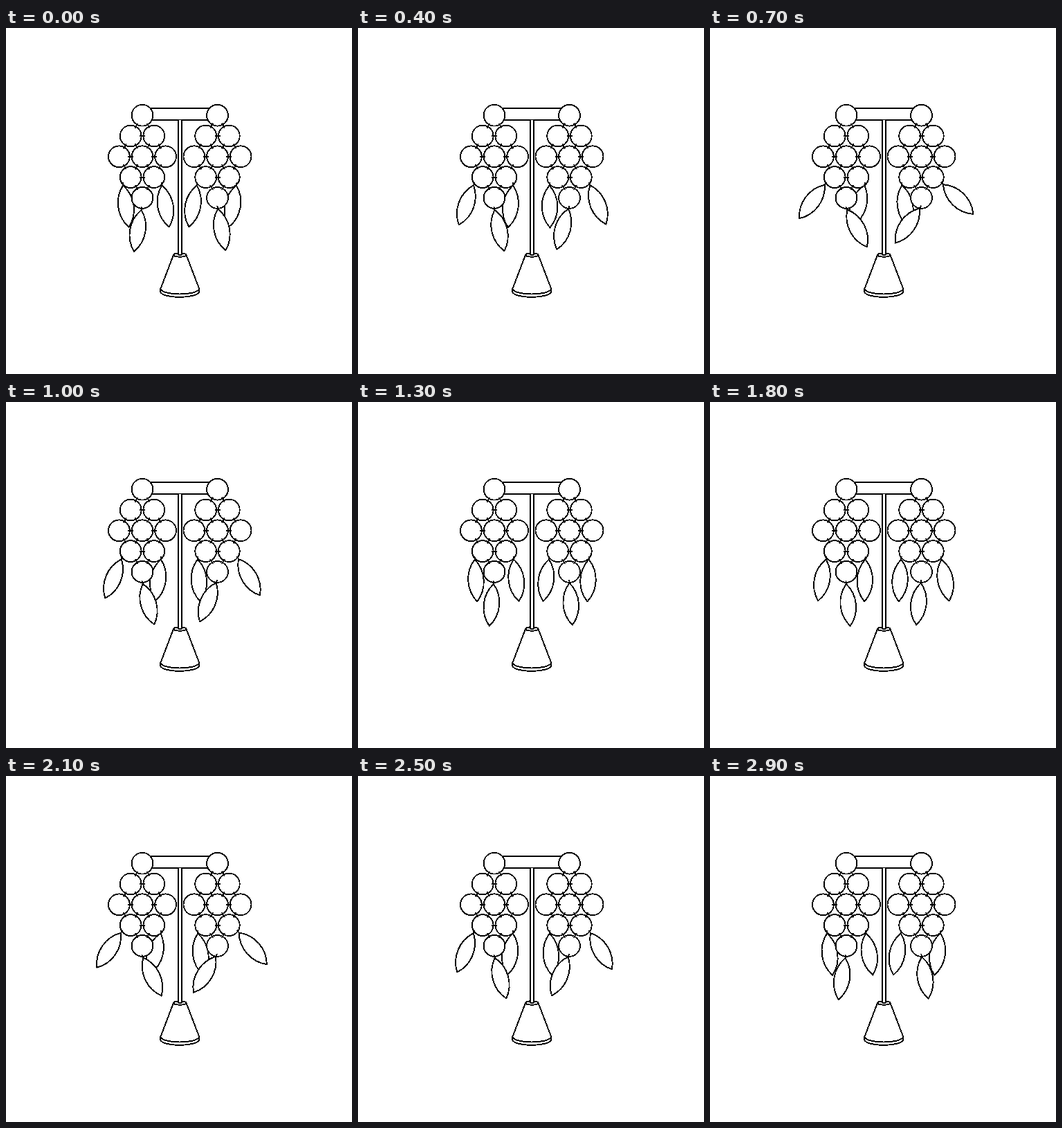
An HTML page that plays this animation: 500 px wide and 500 px high, repeating every 3000 ms.

```html
<!DOCTYPE html>
<html>
<head>
<meta charset="utf-8">
<style>
  html, body { margin: 0; height: 100%; overflow: hidden; background: #fff; }
  svg { display: block; width: 100vw; height: 100vh; }
</style>
</head>
<body>
<svg viewBox="0 0 500 500" fill="#fff" stroke="#000" stroke-width="1.9" stroke-linejoin="round" shape-rendering="crispEdges">
  <g id="stand">
    <path d="M197 116H305V133H197Z"/>
    <path d="M242 328L223.3 377V381.5C227 391.3 275 391.3 279.3 381.5V377L260.5 328Z"/>
    <path d="M223.3 377C227 387 275 387 279.3 377" fill="none"/>
    <ellipse cx="251.3" cy="328" rx="9.2" ry="2.7"/>
    <path d="M248.8 133V327.5Q251.4 329 254 327.5V133"/>
  </g>
  <g id="leaves"></g>
  <g id="beads"></g>
  <g id="hooks"></g>
</svg>
<script>
const STEP = 100, SWING = 1500;

// Pivot x, y, mean angle, amplitude (degrees, positive = tip to the right), phase
const leaves = [
  [168.5, 223, -14.4, 22.7, 9],
  [224.5, 223, -3.2, 13.2, 9],
  [196.4, 258.5, 8.8, -19, 8],
  [276.6, 223, -0.8, -10, 3],
  [333.7, 223, 17.8, -28, 3],
  [305.3, 257, -12.3, 23, 3]
];

function add(parent, tag, attrs) {
  const el = document.createElementNS("http://www.w3.org/2000/svg", tag);
  for (const name in attrs) el.setAttribute(name, attrs[name]);
  return document.getElementById(parent).appendChild(el);
}

function drawCluster(cx) {
  const beads = [];
  [1, 2, 3, 2, 1].forEach((count, row) => {
    for (let i = 0; i < count; i++)
      beads.push([cx + (i - (count - 1) / 2) * 33.6, 126.2 + row * 29.8]);
  });
  for (const [x, y] of beads) add("beads", "circle", { cx: x, cy: y, r: 15.4 });
  // Short links between touching beads
  beads.forEach(([x, y], i) => beads.slice(i + 1).forEach(([u, v]) => {
    const dx = u - x, dy = v - y, dist = Math.hypot(dx, dy);
    if (dist > 36) return;
    const a = 0.5 - 4 / dist, b = 0.5 + 4 / dist;
    add("beads", "line", { x1: x + dx * a, y1: y + dy * a, x2: x + dx * b, y2: y + dy * b });
  }));
}

drawCluster(197);
drawCluster(305.5);

const parts = leaves.map(() => [
  add("leaves", "path", { d: "M0 4.5A47 47 0 0 1 0 65.5A47 47 0 0 1 0 4.5Z" }),
  add("hooks", "line", { y1: 0, y2: 6 })
]);

function draw(now) {
  const time = Math.floor(now / STEP) * STEP % SWING;
  leaves.forEach(([x, y, mean, amp, phase], i) => {
    const angle = mean + amp * Math.cos((time / SWING * 360 + phase) * Math.PI / 180);
    for (const part of parts[i])
      part.setAttribute("transform", `translate(${x} ${y}) rotate(${-angle})`);
  });
}

const start = performance.now();
function tick() {
  draw(performance.now() - start);
  requestAnimationFrame(tick);
}
tick();
</script>
</body>
</html>
```
